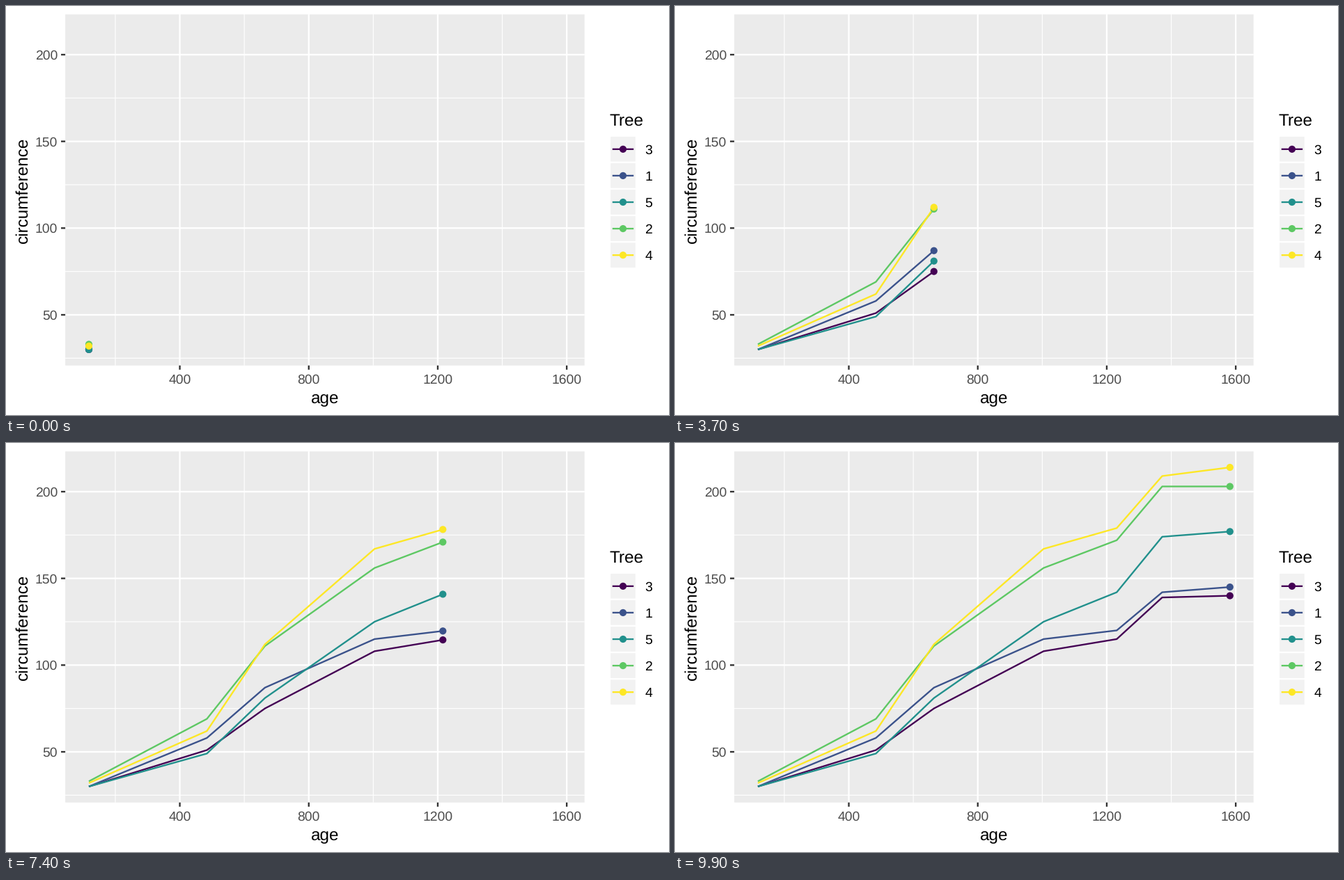
These frames come from a looping animation (952 by 588 pixels, 10 s). A matplotlib script:

```python
import matplotlib.pyplot as plt
import numpy as np
from matplotlib.animation import FuncAnimation
from matplotlib.patches import Circle, Rectangle

plt.rcParams["font.family"] = "Liberation Sans"
plt.rcParams["text.hinting"] = "no_hinting"

W, H, DPI = 952, 588, 64
FRAMES, INTERVAL = 100, 100

# Growth of five orange trees, in legend order
AGE = np.array([118, 484, 664, 1004, 1231, 1372, 1582])
TREES = {
    "3": ("#440154", [30, 51, 75, 108, 115, 139, 140]),
    "1": ("#3B528B", [30, 58, 87, 115, 120, 142, 145]),
    "5": ("#21908C", [30, 49, 81, 125, 142, 174, 177]),
    "2": ("#5DC863", [33, 69, 111, 156, 172, 203, 203]),
    "4": ("#FDE725", [32, 62, 112, 167, 179, 209, 214]),
}
# Each observation falls on a whole frame
KEYS = np.round((FRAMES - 1) * (AGE - AGE[0]) / (AGE[-1] - AGE[0]))

# Panel edges and stroke sizes in pixels
LEFT, RIGHT, TOP, BOTTOM = 85.1, 830.7, 12.1, 516.8
LINE, RADIUS, TICK = 2.35, 5.09, 6.05
SMALL, LARGE = 19.39, 24.24


def pt(px):
    return px * 72 / DPI


def sx(age):
    return LEFT + (age - 44.8) / 1610.4 * (RIGHT - LEFT)


def sy(size):
    return TOP + (223.2 - size) / 202.4 * (BOTTOM - TOP)


fig = plt.figure(figsize=(W / DPI, H / DPI), dpi=DPI, facecolor="white")
ax = fig.add_axes([0, 0, 1, 1])
ax.set_xlim(0, W)
ax.set_ylim(H, 0)
ax.axis("off")


def stroke(xs, ys, color, width=LINE, z=2):
    line, = ax.plot(xs, ys, color=color, lw=pt(width), zorder=z, snap=False,
                    solid_capstyle="butt", solid_joinstyle="round")
    return line


def box(x, y, w, h, color, **kw):
    ax.add_patch(Rectangle((x, y), w, h, fc=color, snap=False, **kw))


def dot(x, y, color):
    return ax.add_patch(Circle((x, y), RADIUS, fc=color, lw=0, zorder=4))


def label(x, y, text, size, color="black", ha="center", **kw):
    ax.text(x, y, text, fontsize=pt(size), color=color, ha=ha,
            va="baseline", zorder=5, **kw)


def draw_panel():
    box(LEFT, TOP, RIGHT - LEFT, BOTTOM - TOP, "#EBEBEB", lw=0)
    x_ticks, y_ticks = range(400, 1601, 400), range(50, 201, 50)
    for shift_x, shift_y, width in ((200, 25, LINE / 2), (0, 0, LINE)):
        for v in y_ticks:
            stroke([LEFT, RIGHT], [sy(v - shift_y)] * 2, "white", width)
        for v in x_ticks:
            stroke([sx(v - shift_x)] * 2, [TOP, BOTTOM], "white", width)
    for v in x_ticks:
        stroke([sx(v)] * 2, [BOTTOM, BOTTOM + TICK], "#333333")
        label(sx(v), 542.4, str(v), SMALL, "#4D4D4D")
    for v in y_ticks:
        stroke([LEFT - TICK, LEFT], [sy(v)] * 2, "#333333")
        label(74.2, sy(v) + 6.9, str(v), SMALL, "#4D4D4D", "right")
    label((LEFT + RIGHT) / 2, 570.6, "age", LARGE)
    label(30.3, (TOP + BOTTOM) / 2, "circumference", LARGE, ha="right",
          rotation=90, rotation_mode="anchor") if False else ax.text(
        30.3, (TOP + BOTTOM) / 2, "circumference", fontsize=pt(LARGE),
        rotation=90, rotation_mode="anchor", ha="center", va="baseline")


def draw_legend():
    key, mid = 38.08, 885.97
    label(866.9, 172.2, "Tree", LARGE, ha="left")
    for i, (name, (color, _)) in enumerate(TREES.items()):
        y = 282 + (i - 2) * key
        box(mid - key / 2, y - key / 2, key, key, "#F2F2F2",
            ec="white", lw=pt(LINE))
        stroke([mid - 0.4 * key, mid + 0.4 * key], [y, y], color)
        dot(mid, y, color)
        label(917.1, y + 6.9, name, SMALL, ha="left")


draw_panel()
draw_legend()
curves = [(stroke([], [], color, z=3), dot(0, 0, color), np.array(sizes))
          for color, sizes in TREES.values()]


def update(frame):
    past = KEYS < frame
    age = np.interp(frame, KEYS, AGE)
    for line, head, sizes in curves:
        size = np.interp(frame, KEYS, sizes)
        line.set_data(sx(np.append(AGE[past], age)),
                      sy(np.append(sizes[past], size)))
        head.set_center((sx(age), sy(size)))
    return [artist for line, head, _ in curves for artist in (line, head)]


anim = FuncAnimation(fig, update, frames=FRAMES, interval=INTERVAL,
                     repeat=True, repeat_delay=0, blit=False)
plt.show()
```
